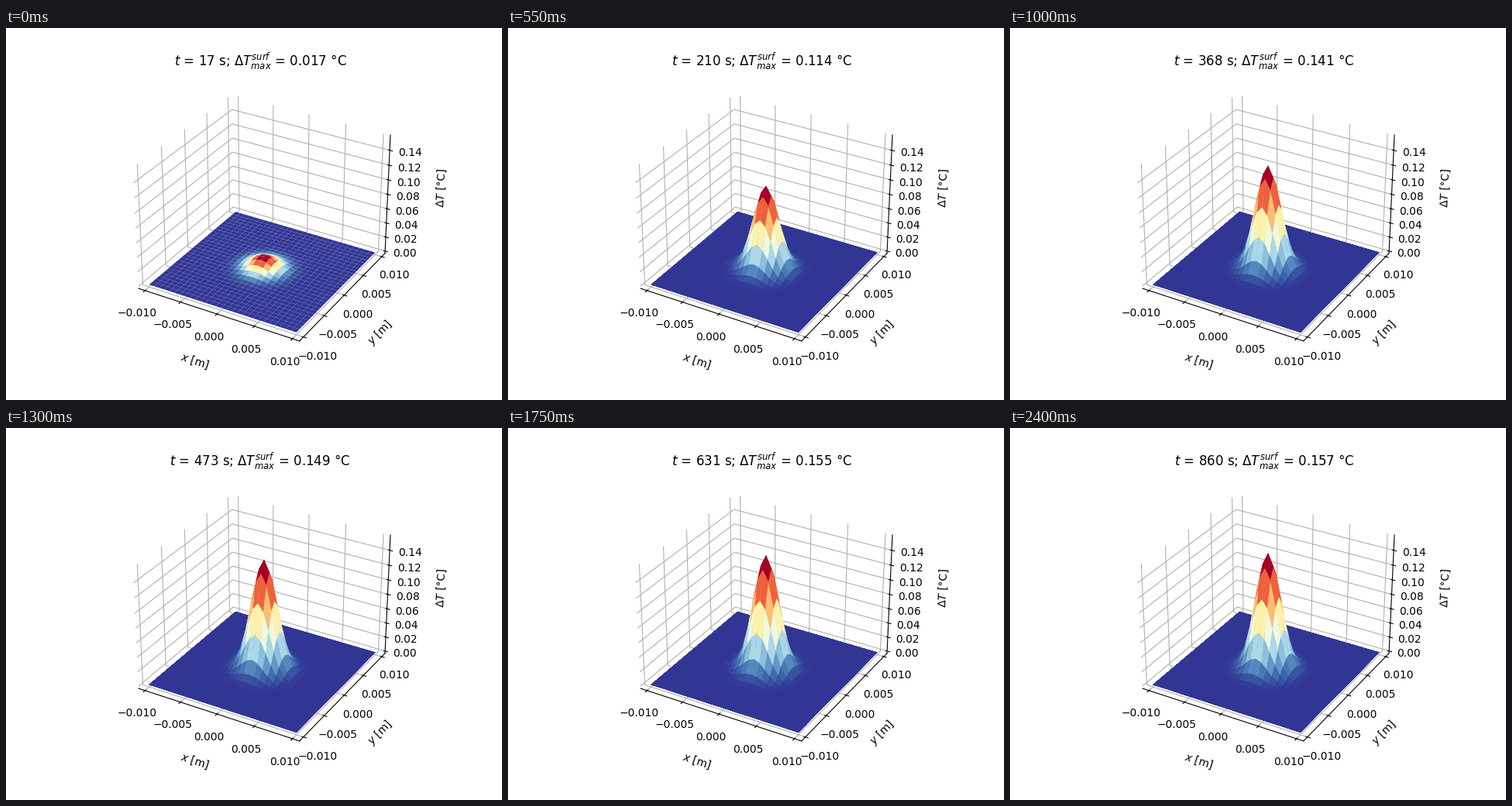
Write a matplotlib script that moves like this. It is 640 px wide and 480 px high and loops after 2450 ms.

```python
import numpy as np
import matplotlib.pyplot as plt
from matplotlib.animation import FuncAnimation

FRAMES = 49
INTERVAL = 50      # ms
STEP = 17.552      # simulated seconds per frame
HALF = 0.01        # half width of the heated plate, m
CELLS = 28
SIGMA = 0.00155    # width of the hot spot, m
FINAL = 0.158      # steady temperature rise, deg C
RATE = 0.00604     # 1/s
DEPTH = 6          # detailed layers kept beneath the newest one
Z_TOP = 0.1571


def sim_time(i):
    return STEP * (i + 1)


def peak(i):
    return FINAL * (1 - 0.9925 * np.exp(-RATE * sim_time(i)))


axis_pts = np.linspace(-HALF, HALF, CELLS + 1)
X, Y = np.meshgrid(axis_pts, axis_pts)
SPOT = np.exp(-(X**2 + Y**2) / (2 * SIGMA**2))

fig = plt.figure(figsize=(6.4, 4.8), dpi=100)
ax = fig.add_subplot(projection="3d", computed_zorder=False)

side = HALF * 12 / 11
margin = Z_TOP / 48
ax.set_xlim(-side, side)
ax.set_ylim(-side, side)
ax.set_zlim(-margin, Z_TOP + margin)
ticks = np.linspace(-HALF, HALF, 5)
ax.set_xticks(ticks)
ax.set_yticks(ticks)
ax.set_zticks(np.arange(8) * 0.02)
ax.set_xlabel("$x$ [m]", labelpad=10)
ax.set_ylabel("$y$ [m]", labelpad=10)
ax.set_zlabel(r"$\Delta T$ [°C]", labelpad=10)
for axis in (ax.xaxis, ax.yaxis, ax.zaxis):
    axis.set_pane_color((1, 1, 1, 1))
title = ax.set_title("")

# Surfaces pile up over time; old ones matter only as a flat sheet.
cmap = plt.get_cmap("RdYlBu_r")
ends = np.ix_([0, -1], [0, -1])
sheets, hills = [], []
for i in range(FRAMES):
    sheets.append(ax.plot_surface(X[ends], Y[ends], 0 * X[ends],
                                  color=cmap(0.0), shade=False))
    hills.append(ax.plot_surface(X, Y, peak(i) * SPOT, cmap=cmap))


def update(n):
    for i, (sheet, hill) in enumerate(zip(sheets, hills)):
        sheet.set_visible(i <= n - DEPTH)
        hill.set_visible(n - DEPTH < i <= n)
    title.set_text(rf"$t$ = {int(sim_time(n))} s; "
                   rf"$\Delta T_{{max}}^{{surf}}$ = {peak(n):.3f} °C")
    return [title]


anim = FuncAnimation(fig, update, frames=FRAMES, interval=INTERVAL,
                     repeat=True, repeat_delay=0, blit=False)
plt.show()
```
